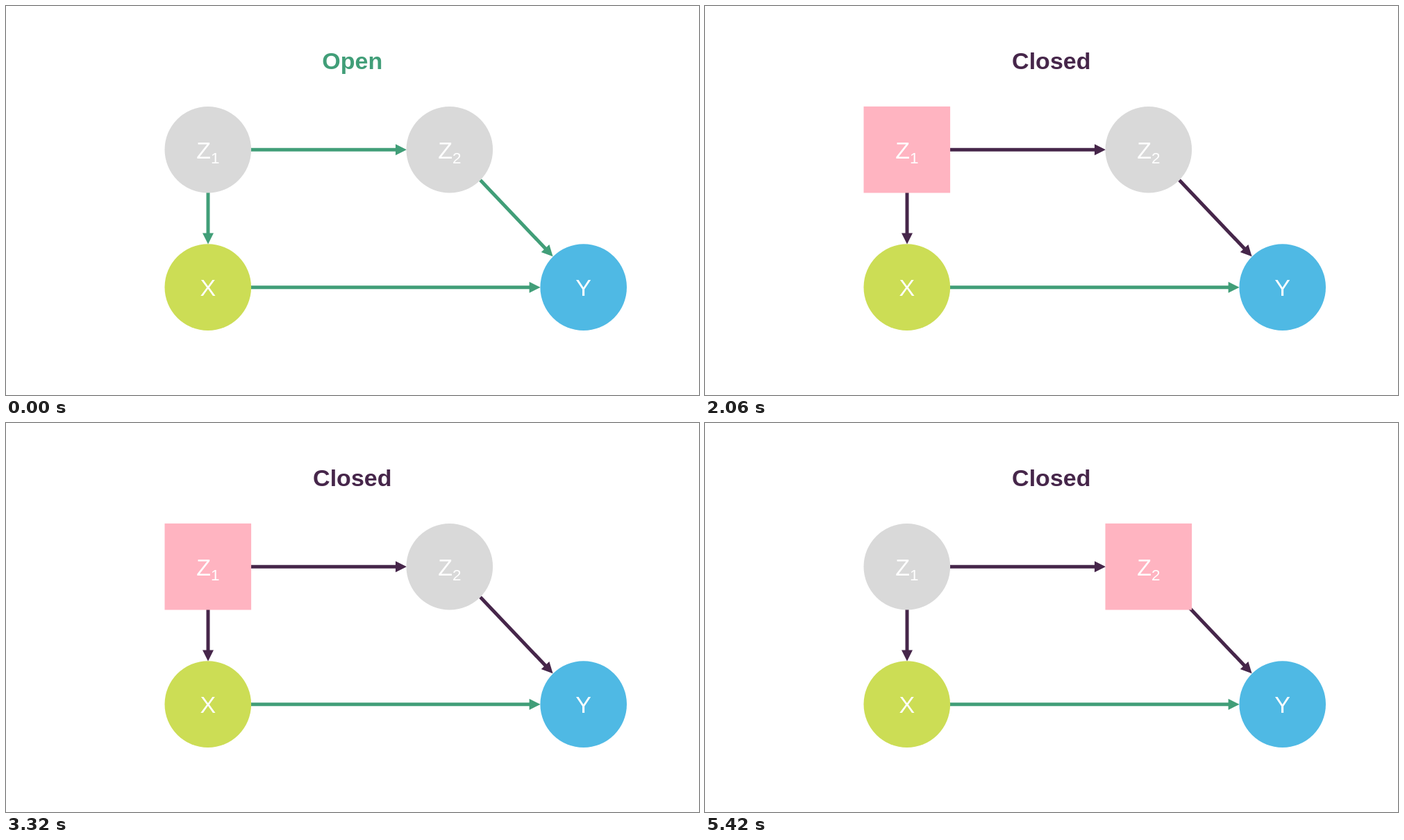
Write an HTML page that moves like this. It is 998x561 px and loops after 6.26 s.

```html
<!DOCTYPE html>
<html lang="en">
<head>
<meta charset="utf-8">
<title>Open and closed paths</title>
<style>
  html, body { margin: 0; width: 100%; height: 100%; overflow: hidden; background: #fff; }
  svg { display: block; width: 998px; height: 561px; }
  text { font-family: "Liberation Sans", Arial, sans-serif; font-size: 34px; text-anchor: middle; fill: #fff; }
  #title { font-weight: 700; }
</style>
</head>
<body>
<svg id="stage" viewBox="0 0 998 561">
  <text id="title" x="498.8" y="90.8"></text>
</svg>
<script>
const GREEN = '#419e78', DARK = '#46264a', PINK = '#ffb4c1', GREY = '#d9d9d9';
const R = 62.3, HEAD = 16, HALF = 8;
const LOOP = 6260;
const stage = document.getElementById('stage');
const title = document.getElementById('title');

function add(tag, attrs, parent = stage) {
  const el = document.createElementNS('http://www.w3.org/2000/svg', tag);
  for (const key in attrs) el.setAttribute(key, attrs[key]);
  return parent.appendChild(el);
}

function arrow(x1, y1, x2, y2) {
  const len = Math.hypot(x2 - x1, y2 - y1);
  const angle = Math.atan2(y2 - y1, x2 - x1) * 180 / Math.PI;
  const g = add('g', { transform: `translate(${x1} ${y1}) rotate(${angle})`, fill: GREEN });
  const neck = len - HEAD;
  add('path', { d: `M0-2.5H${neck + 1}V2.5H0Z` }, g);
  add('path', { d: `M${neck} ${-HALF}L${len} 0L${neck} ${HALF}Z` }, g);
  return g;
}

function node(x, y, fill, label, sub) {
  const box = add('rect', { x: x - R, y: y - R, width: 2 * R, height: 2 * R, rx: R, fill });
  const text = add('text', { x, y: y + 12.6 });
  text.textContent = label;
  if (sub) add('tspan', { dy: 7.6, 'font-size': 22.5 }, text).textContent = sub;
  return box;
}

const path = [
  arrow(352.5, 207.3, 577, 207.3),
  arrow(291, 269, 291, 343.6),
  arrow(683, 251, 787.6, 361.2)
];
arrow(352.5, 405.7, 769.6, 405.7);

const z = [node(290.8, 207.2, GREY, 'Z', '1'), node(638.8, 207.2, GREY, 'Z', '2')];
node(290.8, 405.6, '#ccdd55', 'X');
node(831.7, 405.6, '#4fb9e4', 'Y');

// held: index of the conditioned node, -1 for none
function show(held) {
  const color = held < 0 ? GREEN : DARK;
  title.textContent = held < 0 ? 'Open' : 'Closed';
  title.style.fill = color;
  path.forEach(p => p.setAttribute('fill', color));
  z.forEach((box, i) => {
    box.setAttribute('rx', i === held ? 0 : R);
    box.setAttribute('fill', i === held ? PINK : GREY);
  });
}

const start = performance.now();
let last = -1;
show(last);

function tick() {
  const t = (performance.now() - start) % LOOP;
  const held = t < 2060 ? -1 : t < 4160 ? 0 : 1;
  if (held !== last) show(last = held);
  requestAnimationFrame(tick);
}
requestAnimationFrame(tick);
</script>
</body>
</html>
```
